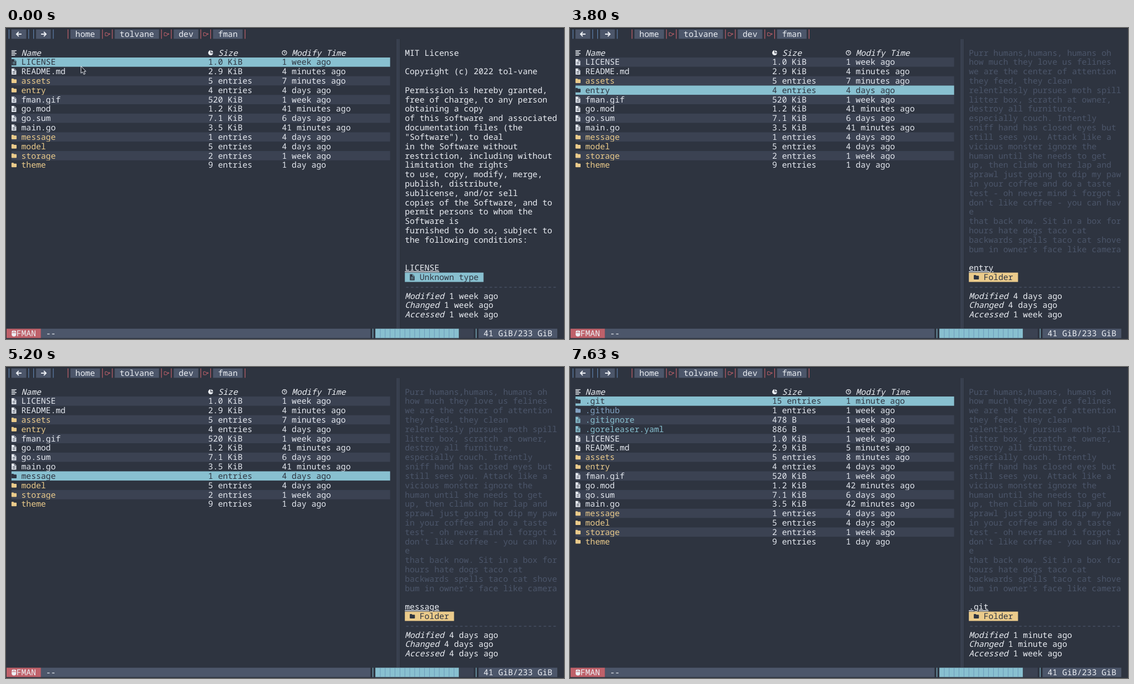
Recreate the animation shown at these times as an HTML page. Size 1002 by 559 pixels, loop 8 s.

```html
<!DOCTYPE html>
<html lang="en">
<head>
<meta charset="utf-8">
<title>fman</title>
<style>
  html, body { margin: 0; width: 100%; height: 100%; overflow: hidden; background: #2e3440; }
  svg { display: block; width: 1002px; height: 559px; }
  text {
    font: 500 14.717px "Noto Sans Mono", "DejaVu Sans Mono", monospace;
    white-space: pre;
    text-rendering: geometricPrecision;
  }
  .em { font-style: italic; }
</style>
</head>
<body>
<svg id="stage" viewBox="0 0 1002 559">
  <g id="chrome"></g>
  <g id="view"></g>
  <path id="cursor" d="M.7 .7V13.2L3.6 10.8L5.8 15.4L8 14.4L6 10H9.6Z" fill="#20242d" stroke="#e5e9f0" stroke-width="1"/>
</svg>
<script>
const LOOP = 8000;
const BG = '#2e3440', STRIPE = '#3b4252', GREY = '#4c566a', TEXT = '#e5e9f0', WHITE = '#eceff4';
const CYAN = '#88c0d0', BLUE = '#5e81ac', SKY = '#81a1c1', YELLOW = '#ebcb8b', RED = '#bf616a';

// Terminal cell grid
const CELL_W = 8.83, CELL_H = 16.81;
const colX = col => 1 + col * CELL_W;
const midY = row => 11 + row * CELL_H;

const escape = s => s.replace(/&/g, '&amp;').replace(/</g, '&lt;');
const label = (col, row, s, fill = WHITE, attrs = '') =>
  `<text x="${colX(col)}" y="${midY(row) + 5}" fill="${fill}" ${attrs}>${escape(s)}</text>`;
const fillCells = (col, row, count, fill) =>
  `<rect x="${colX(col)}" y="${midY(row) - CELL_H / 2}" width="${count * CELL_W}" height="${CELL_H}" fill="${fill}"/>`;
const bar = (col, row, color) =>
  `<rect x="${colX(col) + CELL_W / 2 - .6}" y="${midY(row) - CELL_H / 2}" width="1.2" height="${CELL_H}" fill="${color}"/>`;
const at = (col, row, shapes) => `<g transform="translate(${colX(col)} ${midY(row)})">${shapes}</g>`;
const line = (d, color, width = 1) => `<path d="${d}" fill="none" stroke="${color}" stroke-width="${width}"/>`;

const fileIcon = (col, row, color, back) => at(col, row,
  `<path d="M.2-5.5H5.4L8.6-2.3V5.5H.2Z" fill="${color}"/>` + line('M2 .2H6.8M2 2.8H6.8M5.4-5.3V-2.3H8.4', back));
const folderIcon = (col, row, color) => at(col, row,
  `<path d="M0-3Q0-4 1-4H3.4L4.6-2.7H8.2Q9.2-2.7 9.2-1.7V3Q9.2 4 8.2 4H1Q0 4 0 3Z" fill="${color}"/>`);

function drawChrome() {
  let out = `<rect width="1002" height="1.5" fill="#242933"/>`;

  [[0, 'M9-4L5 0L9 4M5 0H14'], [5, 'M14-4L18 0L14 4M18 0H9']].forEach(([col, d], i) => {
    out += bar(col, 0, BLUE) + fillCells(col + 1, 0, 3, GREY) + bar(col + 4, 0, BLUE);
    out += at(col + 1, 0, `<g transform="translate(${i ? 0 : 4} 0)">${line(d, WHITE, 1.8)}</g>`);
  });

  let col = 12;
  ['home', 'tolvane', 'dev', 'fman'].forEach((name, i) => {
    if (i) {
      out += at(col + 1, 0, line('M.5-2.5V3H4.5Q6 3 6 1.5V.6H8.8V-1H4.8L3.5-2.8Z', RED));
      col += 2;
    }
    const width = name.length + 2;
    out += bar(col, 0, RED) + fillCells(col + 1, 0, width, GREY) + label(col + 2, 0, name);
    col += width + 1;
    out += bar(col, 0, RED);
  });

  out += at(1, 2, line('M0-4H9M0-1.3H6.5M0 1.4H9M0 4.1H6.5', WHITE, 1.4));
  out += at(41, 2, `<circle cx="4.5" cy="0" r="4.5" fill="${WHITE}"/>` + line('M4.8-4.5V0H9', BG, 1.2));
  out += at(56, 2, `<circle cx="4.5" cy="0" r="4" fill="none" stroke="${WHITE}" stroke-width="1.2"/>` + line('M4.5-2.6V.3H6.4', WHITE));
  [[3, 'Name'], [43, 'Size'], [58, 'Modify Time']].forEach(([c, s]) => out += label(c, 2, s, WHITE, 'class="em"'));

  out += line('M702.5 20V540M705.5 20V540', GREY);

  out += fillCells(0, 32, 7, RED);
  out += at(1, 32, `<path d="M.3-1V-2Q.3-5.5 4.4-5.5Q8.5-5.5 8.5-2V1.5Q8.5 5.5 4.4 5.5Q.3 5.5 .3 1.5Z" fill="${WHITE}"/>` +
    line('M.3-1.2H8.5M4.4-5.5V-1.2', RED, .9));
  out += label(2, 32, 'FMAN') + fillCells(7, 32, 67, GREY) + label(8, 32, '--');
  out += bar(74, 32, CYAN) + fillCells(75, 32, 17, CYAN) + fillCells(92, 32, 3, STRIPE) + bar(95, 32, CYAN);
  for (let c = 76; c < 92; c++)
    out += `<rect x="${colX(c) - .4}" y="${midY(32) - CELL_H / 2}" width=".8" height="${CELL_H}" fill="${BLUE}" opacity=".75"/>`;
  return out + fillCells(96, 32, 16, GREY) + label(97, 32, '41 GiB/233 GiB');
}

const CATS = `Purr humans,humans, humans oh
how much they love us felines
we are the center of attention
they feed, they clean
relentlessly pursues moth spill
litter box, scratch at owner,
destroy all furniture,
especially couch. Intently
sniff hand has closed eyes but
still sees you. Attack like a
vicious monster ignore the
human until she needs to get
up, then climb on her lap and
sprawl just going to dip my paw
in your coffee and do a taste
test - oh never mind i forgot i
don't like coffee - you can hav
e
that back now. Sit in a box for
hours hate dogs taco cat
backwards spells taco cat shove
bum in owner's face like camera`;

const PREVIEWS = {
  'LICENSE': `MIT License

Copyright (c) 2022 tol-vane

Permission is hereby granted,
free of charge, to any person
obtaining a copy
of this software and associated
documentation files (the
"Software"), to deal
in the Software without
restriction, including without
limitation the rights
to use, copy, modify, merge,
publish, distribute,
sublicense, and/or sell
copies of the Software, and to
permit persons to whom the
Software is
furnished to do so, subject to
the following conditions:`,
  'README.md': `# fman

A file manager for the terminal
written in Go.

![fman](fman.gif)

## Features

- Browse files and folders with
the keyboard or the mouse
- Preview text files
- Show hidden files
- Themes

## Building

go build .

## License

MIT`,
  'go.mod': `module fman

go 1.18

require (
    github.com/charmbracelet/bu
bbletea v0.22.0
    github.com/charmbracelet/li
pgloss v0.5.0
)`,
  'go.sum': `github.com/charmbracelet/bubble
tea v0.22.0/go.mod
github.com/charmbracelet/lipglo
ss v0.5.0/go.mod`,
  'main.go': `package main

import (
    "fmt"
    "os"
)

func main() {
    fmt.Println(os.Args)
}`
};

// name, size, modified, accessed; a number is a count of minutes
const FILES = [
  ['LICENSE', '1.0 KiB', '1 week'],
  ['README.md', '2.9 KiB', 4, 4],
  ['assets', '5 entries', 7, 7],
  ['entry', '4 entries', '4 days', '1 week'],
  ['fman.gif', '520 KiB', '1 week'],
  ['go.mod', '1.2 KiB', 41],
  ['go.sum', '7.1 KiB', '6 days'],
  ['main.go', '3.5 KiB', 41],
  ['message', '1 entries', '4 days'],
  ['model', '5 entries', '4 days'],
  ['storage', '2 entries', '1 week'],
  ['theme', '9 entries', '1 day', '1 week']
];
const HIDDEN = [
  ['.git', '15 entries', '1 minute', '1 week'],
  ['.github', '1 entries', '1 week'],
  ['.gitignore', '478 B', '1 week'],
  ['.goreleaser.yaml', '886 B', '1 week']
];
const TYPES = { 'fman.gif': 'image/gif', 'README.md': 'text/markdown' };

const isFolder = file => file[1].endsWith('entries');
const ago = (when, later = 0) => (typeof when === 'number' ? when + later + ' minutes' : when) + ' ago';

function drawList(files, selected, later) {
  return files.map((file, i) => {
    const [name, size, modified] = file;
    const row = i + 3, active = name === selected, folder = isFolder(file);
    const back = active ? CYAN : i % 2 ? BG : STRIPE;
    const plain = active ? BG : TEXT;
    const tint = active ? BG : name[0] === '.' ? (folder ? SKY : CYAN) : folder ? YELLOW : TEXT;
    return fillCells(1, row, 77, back) +
      (folder ? folderIcon(1, row, tint) : fileIcon(1, row, tint, back)) +
      label(3, row, name, tint) + label(41, row, size, plain) + label(56, row, ago(modified, later), plain);
  }).join('');
}

function drawInfo(file) {
  const [name, , modified, accessed = modified] = file;
  const folder = isFolder(file);
  const preview = PREVIEWS[name];
  const type = folder ? 'Folder' : TYPES[name] || 'Unknown type';
  const badge = folder ? YELLOW : CYAN;
  let out = (preview || CATS).split('\n')
    .map((s, i) => label(81, i + 2, s, preview ? WHITE : GREY)).join('');
  out += label(81, 25, name, WHITE, 'text-decoration="underline"');
  out += fillCells(81, 26, type.length + 4, badge) + label(84, 26, type, BG);
  out += folder ? folderIcon(82, 26, BG) : fileIcon(82, 26, BG, badge);
  out += label(81, 27, '-'.repeat(31), GREY);
  [['Modified', modified], ['Changed', modified], ['Accessed', accessed]].forEach(([key, when], i) => {
    out += label(81, 28 + i, key, WHITE, 'class="em"') + label(82 + key.length, 28 + i, ago(when));
  });
  return out;
}

// start time, selected entry, entry described on the right
const STEPS = [
  [0, 'LICENSE', 'LICENSE'],
  [2400, 'README.md', 'LICENSE'],
  [2430, 'README.md', 'README.md'],
  [2870, 'assets', 'assets'],
  [3800, 'entry', 'entry'],
  [4470, 'fman.gif', 'entry'],
  [4500, 'fman.gif', 'fman.gif'],
  [5070, 'go.mod', 'fman.gif'],
  [5100, 'go.mod', 'go.mod'],
  [5130, 'go.sum', 'go.sum'],
  [5170, 'main.go', 'main.go'],
  [5200, 'message', 'message'],
  [5570, 'model', 'model'],
  [6000, 'storage', 'storage'],
  [6400, 'theme', 'theme'],
  [6870, 'LICENSE', 'LICENSE'],
  [7630, '.git', '.git']
];
const POINTER = [[0, 134, 68], [30, 133.5, 65.5], [2200, 40, 71], [2400, -50, -50]];

const byId = id => document.getElementById(id);
const current = (steps, t) => steps.filter(s => s[0] <= t).pop();
let shown;

function render(t) {
  const step = current(STEPS, t);
  if (step !== shown) {
    shown = step;
    const [, selected, described] = step;
    const hidden = selected[0] === '.';
    const files = hidden ? HIDDEN.concat(FILES) : FILES;
    byId('view').innerHTML = drawList(files, selected, hidden ? 1 : 0) +
      drawInfo(files.find(f => f[0] === described));
  }
  const [, x, y] = current(POINTER, t);
  byId('cursor').setAttribute('transform', `translate(${x} ${y})`);
}

byId('chrome').innerHTML = drawChrome();
const start = performance.now();
function tick() {
  render((performance.now() - start) % LOOP);
  requestAnimationFrame(tick);
}
tick();
</script>
</body>
</html>
```
